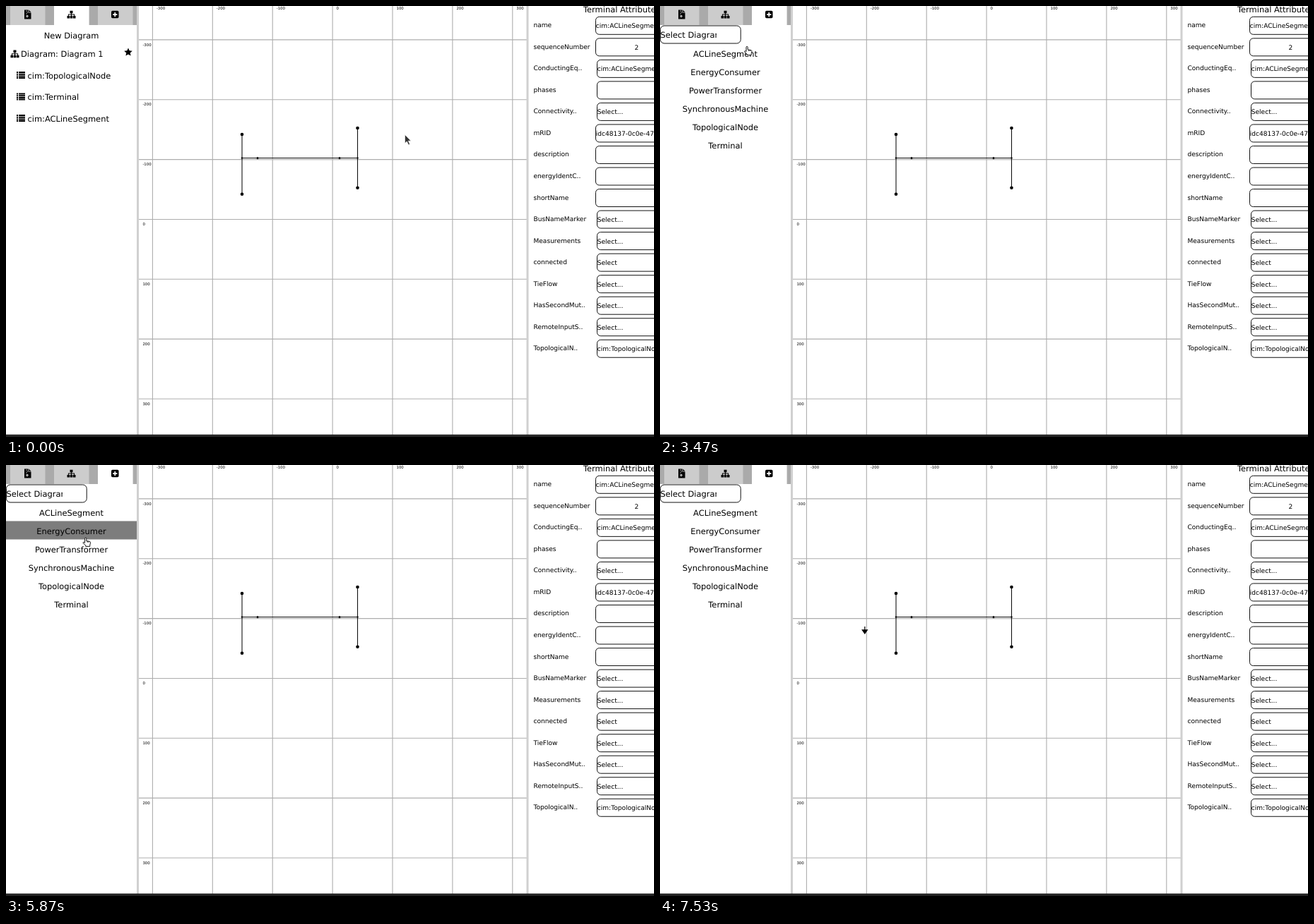
An HTML page for the animation above (8000 ms loop, 917x611 px).

```html
<!DOCTYPE html>
<html lang="en">
<head>
<meta charset="utf-8">
<title>Diagram editor</title>
<style>
html, body { margin: 0; width: 100%; height: 100%; overflow: hidden; background: #fff; }
svg { display: block; font: 11.45px "DejaVu Sans", sans-serif; text-rendering: geometricPrecision; }
.small { font-size: 9.05px; }
.tiny { font-size: 5.4px; }
.mid { text-anchor: middle; }
.box { fill: #fff; stroke: #111; }
.grid { stroke: #adadad; stroke-width: 1.1; }
.wire { stroke: #111; stroke-width: 1.1; }
</style>
</head>
<body>
<svg id="stage" width="917" height="611" viewBox="0 0 917 611">
  <defs>
    <g id="sitemap">
      <path d="M4 0h4v3.4H6.6v1.4h4v2.4H12v3.6H8.4V7.2h1.2V5.8h-3v1.4h1.2v3.6H4.2V7.2h1.2V5.8h-3v1.4h1.2v3.6H0V7.2h1.4V4.8h4V3.4H4z"/>
    </g>
    <path id="list" d="M0 0h2v2H0zM3 0h9v2H3zM0 2.7h2v2H0zM3 2.7h9v2H3zM0 5.4h2v2H0zM3 5.4h9v2H3zM0 8.1h2v2H0zM3 8.1h9v2H3z"/>
    <clipPath id="selectClip"><rect y="28" width="80" height="25"/></clipPath>
  </defs>
  <g id="canvas"></g>
  <g id="form"></g>
  <path fill="#d0d0d0" d="M185 0h3v608h-3zM736.5 0h3v608h-3z"/>
  <path fill="#aaa" d="M0 0h185v27H0z"/>
  <path fill="#ccc" d="M6 0h49.5v27H6zM68 0h49.5v27H68zM130 0h49.5v27H130z"/>
  <rect id="active" y="0" width="49.5" height="27" fill="#fff"/>
  <path d="M26 5.5h5.5v4H35.500v9H26z"/>
  <path d="M32.300 5.500L35.500 8.700H32.300z"/>
  <path d="M28.500 7h1.300M29.500 9h1.300M28.500 11h1.300M29 13.500h2v2h-2z" fill="none" stroke="#ddd"/>
  <use href="#sitemap" x="86.500" y="6.800"/>
  <rect x="149" y="6.800" width="10.500" height="10.500" rx="1.700"/>
  <path d="M154.250 9v6.200M151.150 12.100h6.200" stroke="#fff" stroke-width="1.700"/>
  <rect id="hover" width="185" height="26" fill="#7d7d7d"/>
  <g id="tree"></g>
  <g id="create"></g>
  <rect y="607.500" width="917" height="3.500" fill="#222"/>
  <path id="arrow" d="M.5 .5V12.500L3.300 10L5.500 14.800L7.500 13.900L5.300 9.200H9z" fill="#333" stroke="#fff" stroke-width=".6"/>
  <path id="hand" d="M-1 7V1.500a1.100 1.100 0 0 1 2.200 0V4.800L5.800 5.600Q7.300 6 7 7.700L6.200 10.500V12.600H.2V11.200L-3.800 7.600Q-3 5.700 -1 7.500zM2.600 5.200V7M4.600 5.500V7" fill="#fff" stroke="#111"/>
  <path id="consumer" d="M-.6 -5H.6V-.8H4.700L0 6L-4.700 -.8H-.6z"/>
</svg>
<script>
const $ = id => document.getElementById(id);
const text = (x, y, s, cls = "") => `<text x="${x}" y="${y}" class="${cls}">${s}</text>`;
const line = (x1, y1, x2, y2, cls) => `<path class="${cls}" d="M${x1} ${y1}L${x2} ${y2}"/>`;
const dot = (x, y, r) => `<circle cx="${x}" cy="${y}" r="${r}"/>`;

// Drawing area
let art = "";
for (let i = 0; i < 7; i++) {
  const x = 207.4 + 84.9 * i, y = 47.9 + 84.85 * i, n = (i - 3) * 100;
  art += line(x, 0, x, 608, "grid") + line(188, y, 737, y, "grid")
    + text(x + 5.5, 5.3, n, "tiny") + text(193.4, y + 8.7, n, "tiny");
}
for (const [x, y] of [[334, 182], [497.5, 173]])
  art += line(x, y, x, y + 84.7, "wire") + dot(x, y, 2.3) + dot(x, y + 84.7, 2.3) + dot(x, 215.5, 1.2);
art += line(334, 215.5, 497.5, 215.5, "wire") + dot(356, 215.5, 1.5) + dot(472, 215.5, 1.5);
$("canvas").innerHTML = art;

// Attribute form: label, value, 1 for a text input
const fields = [
  ["name", "cim:ACLineSegment", 1], ["sequenceNumber", "", 1], ["ConductingEq..", "cim:ACLineSegment"],
  ["phases", ""], ["Connectivity..", "Select..."], ["mRID", "idc48137-0c0e-47", 1],
  ["description", "", 1], ["energyIdentC..", "", 1], ["shortName", "", 1],
  ["BusNameMarker", "Select..."], ["Measurements", "Select..."], ["connected", "Select"],
  ["TieFlow", "Select..."], ["HasSecondMut..", "Select..."], ["RemoteInputS..", "Select..."],
  ["TopologicalN..", "cim:TopologicalNode"]
];
$("form").innerHTML = text(817, 9, "Terminal Attributes") + fields.map(([label, value, input], i) => {
  const y = 30.53 * i, x = input ? 834.5 : 836.5;
  return text(746.5, y + 30.3, label, "small")
    + `<rect class="box" x="${x}" y="${15.3 + y}" width="120" height="25" rx="5"/>`
    + text(x + .3, y + 31.3, value, "small");
}).join("") + text(892.5, 62, "2", "small mid");

// Left panel pages
$("tree").innerHTML = text(92.5, 46, "New Diagram", "mid")
  + `<use href="#sitemap" x="6.5" y="62.5"/>` + text(21, 72, "Diagram: Diagram 1")
  + `<path d="M173 59.5l1.700 3.800 4.100.4-3.100 2.700.9 4.100-3.600-2.100-3.600 2.100.9-4.100-3.100-2.700 4.100-.4z"/>`
  + ["TopologicalNode", "Terminal", "ACLineSegment"].map((s, i) =>
    `<use href="#list" x="15" y="${93 + 30.5 * i}"/>` + text(30.5, 102.5 + 30.5 * i, "cim:" + s)).join("");
$("create").innerHTML = `<rect class="box" x=".5" y="28" width="113.700" height="25" rx="5.500"/>`
  + `<g clip-path="url(#selectClip)">${text(.5, 45.3, "Select Diagram")}</g>`
  + ["ACLineSegment", "EnergyConsumer", "PowerTransformer", "SynchronousMachine", "TopologicalNode", "Terminal"]
    .map((s, i) => text(92.5, 72 + 26 * i, s, "mid")).join("");

// Pointer path: arrive, leave, x, y
const path = [
  [0, 67, 564, 182], [267, 267, 430, 161], [467, 733, 292, 173], [1133, 1400, 102, 108],
  [2000, 3200, 153, 14], [3467, 3467, 123, 57], [4000, 4067, 101, 111], [4200, 4400, 101, 109.7],
  [4533, 4600, 103, 99], [4667, 5800, 103, 97], [6067, 6067, 185, 150],
  [6333, 6867, 246, 207], [7533, 8000, 289.8, 234]
];
// Speed is zero at rests, averaged at points passed through
const speed = (i, k) => {
  const [a, b] = path[i];
  return a < b ? 0 : (path[i + 1][k] - path[i - 1][k]) / (path[i + 1][0] - path[i - 1][1]);
};
function pointer(t) {
  const i = path.findLastIndex(p => p[0] <= t), p = path[i], q = path[i + 1];
  if (t <= p[1] || !q) return [p[2], p[3]];
  const d = q[0] - p[1], u = (t - p[1]) / d, e = u * u * (3 - 2 * u);
  return [2, 3].map(k => p[k] + (q[k] - p[k]) * e
    + d * u * (1 - u) * ((1 - u) * speed(i, k) - u * speed(i + 1, k)));
}

const show = (id, on) => $(id).setAttribute("visibility", on ? "visible" : "hidden");
const step = 1000 / 15;

function draw(now) {
  const t = Math.floor((now % 8000 + 4) / step) * step + .5;
  const [x, y] = pointer(t), create = t > 2660, inPanel = x < 186;
  const row = Math.floor((y - 57.5) / 26);
  show("tree", !create);
  show("create", create);
  $("active").setAttribute("x", create ? 130 : 68);
  show("hover", inPanel && (create ? row >= 0 && row < 6 && t > 3500 : row === -1));
  $("hover").setAttribute("y", 53.5 + 26 * row);
  const shape = inPanel ? "hand" : create ? "consumer" : "arrow";
  for (const id of ["hand", "arrow", "consumer"]) show(id, id === shape);
  $(shape).setAttribute("transform", `translate(${x} ${y})`);
  requestAnimationFrame(draw);
}
requestAnimationFrame(draw);
</script>
</body>
</html>
```
